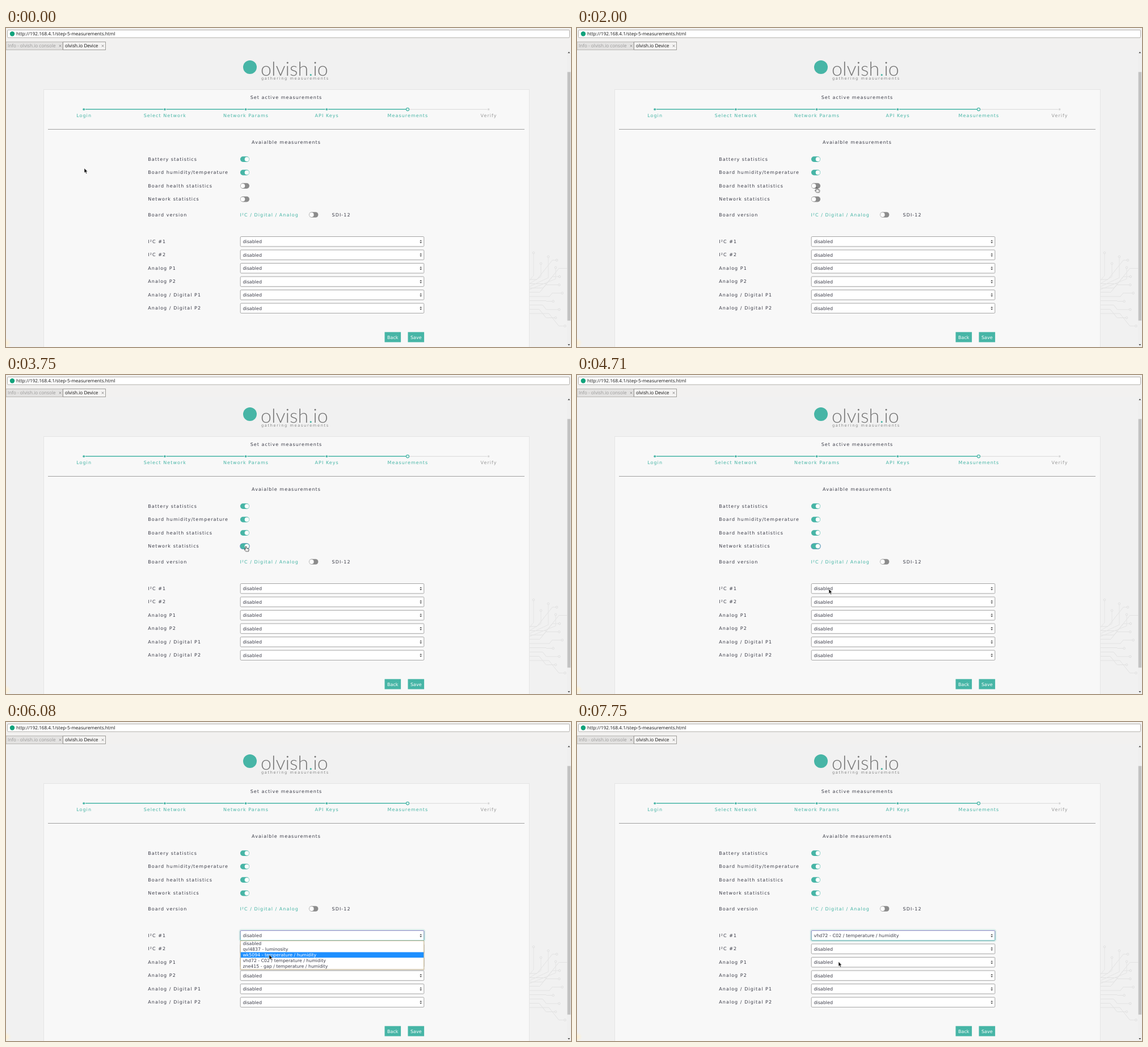
Write an HTML page that moves like this. It is 996 px wide and 562 px high and loops after 8 s.

```html
<!DOCTYPE html>
<html lang="en">
<head>
<meta charset="utf-8">
<title>Device measurements</title>
<style>
html, body { margin: 0; width: 100%; height: 100%; overflow: hidden; background: #f1f1f1; }
svg { display: block; width: 996px; height: 562px; }
text { font: 8px "DejaVu Sans", sans-serif; fill: #3b3c48; text-rendering: geometricPrecision; white-space: pre; }
.label { letter-spacing: 1.05px; }
.mid { text-anchor: middle; }
.teal { fill: #47b5a6; }
.pale { fill: #999; }
.ui { font: 8.18px "Open Sans", sans-serif; fill: #111; }
.ui.pale { fill: #999; }
.option { font-size: 7.82px; }
.white { fill: #fff; }
.brand { font: 300 34px Lato, sans-serif; fill: #757575; }
.tag { font-size: 6.6px; letter-spacing: 1.65px; fill: #858585; }

.anim { animation: 8s step-end infinite; }
#cursor { animation-name: move; }
#hand { animation-name: hand; }
#arrow { animation-name: arrow; }
#ring2 { animation-name: ring2; }
#ring3 { animation-name: ring3; }
#focus { animation-name: focus; }
#popup { animation-name: popup; }
#before { animation-name: before; }
#after { animation-name: after; }
#hi0 { animation-name: hi0; }
#hi1 { animation-name: hi1; }
#hi2 { animation-name: hi2; }
#hi3 { animation-name: hi3; }
#track2 { animation-name: track2; }
#knob2 { animation-name: knob2; }
#track3 { animation-name: track3; }
#knob3 { animation-name: knob3; }

@keyframes move {
  0% { transform: translate(138px, 247px); }
  8.875% { transform: translate(138px, 247px); animation-timing-function: steps(11, jump-start); }
  14.65% { transform: translate(290px, 263px); }
  19.75% { transform: translate(290px, 263px); animation-timing-function: steps(2, jump-start); }
  22% { transform: translate(426.5px, 286px); }
  22.875% { transform: translate(426.5px, 286px); animation-timing-function: steps(3, jump-start); }
  26.0625% { transform: translate(422.5px, 280.5px); }
  38% { transform: translate(422.5px, 280.5px); animation-timing-function: steps(3, jump-start); }
  41.9375% { transform: translate(423px, 301.5px); }
  50% { transform: translate(423px, 301.5px); animation-timing-function: steps(8, jump-start); }
  60.143% { transform: translate(444px, 377px); }
  65.625% { transform: translate(444.7px, 380px); }
  68.25% { transform: translate(451px, 384px); }
  69.75% { transform: translate(459px, 389.5px); }
  71.375% { transform: translate(463.5px, 394.3px); }
  72.875% { transform: translate(464px, 400px); }
  74.5% { transform: translate(464px, 405px); }
  76% { transform: translate(464px, 410px); }
  88.5% { transform: translate(463.5px, 413.5px); }
  89.8125% { transform: translate(462px, 418px); }
  91.125%, 100% { transform: translate(461px, 422.3px); }
}
@keyframes hand { 0% { opacity: 0; } 20.875% { opacity: 1; } 51.25%, 100% { opacity: 0; } }
@keyframes arrow { 0% { opacity: 1; } 20.875% { opacity: 0; } 51.25%, 100% { opacity: 1; } }
@keyframes ring2 { 0% { opacity: 0; } 33.375% { opacity: 1; } 43.75%, 100% { opacity: 0; } }
@keyframes ring3 { 0% { opacity: 0; } 43.75% { opacity: 1; } 60.375%, 100% { opacity: 0; } }
@keyframes focus { 0% { opacity: 0; } 60.375%, 100% { opacity: 1; } }
@keyframes popup { 0% { opacity: 0; } 62% { opacity: 1; } 96.875%, 100% { opacity: 0; } }
@keyframes before { 0% { opacity: 1; } 96.875%, 100% { opacity: 0; } }
@keyframes after { 0% { opacity: 0; } 96.875%, 100% { opacity: 1; } }
@keyframes hi0 { 0% { opacity: 1; } 72.875%, 100% { opacity: 0; } }
@keyframes hi1 { 0% { opacity: 0; } 72.875% { opacity: 1; } 76%, 100% { opacity: 0; } }
@keyframes hi2 { 0% { opacity: 0; } 76% { opacity: 1; } 89.8125%, 100% { opacity: 0; } }
@keyframes hi3 { 0% { opacity: 0; } 89.8125%, 100% { opacity: 1; } }
@keyframes track2 { 0% { fill: #8c8c8c; } 33.375% { fill: #6aa299; } 34.875%, 100% { fill: #47b5a6; } }
@keyframes knob2 { 0% { transform: none; } 33.375% { transform: translate(3.6px); } 34.875%, 100% { transform: translate(7.2px); } }
@keyframes track3 { 0% { fill: #8c8c8c; } 45.3125% { fill: #6aa299; } 46.875%, 100% { fill: #47b5a6; } }
@keyframes knob3 { 0% { transform: none; } 45.3125% { transform: translate(3.6px); } 46.875%, 100% { transform: translate(7.2px); } }
</style>
</head>
<body>
<svg id="stage" viewBox="0 0 996 562" xmlns="http://www.w3.org/2000/svg"></svg>
<script>
const TEAL = '#47b5a6';
const out = [];
const add = s => out.push(s);
const rect = (x, y, w, h, fill, more = '') =>
  `<rect x="${x}" y="${y}" width="${w}" height="${h}" fill="${fill}" ${more}/>`;
const circle = (x, y, r, fill, more = '') =>
  `<circle cx="${x}" cy="${y}" r="${r}" fill="${fill}" ${more}/>`;
const path = (d, stroke, width = 1, fill = 'none') =>
  `<path d="${d}" stroke="${stroke}" stroke-width="${width}" fill="${fill}"/>`;
const text = (x, y, str, cls = 'label') => `<text x="${x}" y="${y}" class="${cls}">${str}</text>`;
const anim = (id, inner) => `<g id="${id}" class="anim">${inner}</g>`;

function browser() {
  add(rect(0, 0, 996, 39, '#f2f1f0'));
  add(rect(2.5, 3.5, 991, 13.5, '#fff', 'rx="1.5" stroke="#b3b0ac"'));
  add(circle(11, 10.3, 4.2, '#12a37c'));
  add(text(18, 13.3, 'http://192.168.4.1/step-5-measurements.html', 'ui'));
  add(rect(0, 24.5, 100, 14, '#e3e2e1', 'stroke="#b9b7b4"'));
  add(rect(100.5, 24.5, 75, 14, '#f4f3f2', 'stroke="#a09e9b"'));
  add(text(3, 34.3, 'Info - olvish.io console', 'ui pale'));
  add(text(104, 34.3, 'olvish.io Device', 'ui'));
  for (const x of [95.5, 170.5])
    add(path(`M${x - 1.7} 29.8l3.4 3.4m0-3.4l-3.4 3.4`, '#777', 0.9));
}

function circuit() {
  // traces fanning out behind the card
  for (let i = 0; i < 9; i++) {
    const y = 443 + i * 7.5, bend = 936 + (i * 17) % 23, rise = 34 - i * 7;
    const end = bend + Math.abs(rise) * 0.8, tail = 6 + (i * 11) % 17;
    add(path(`M922 ${y}H${bend}L${end} ${y - rise}h${tail}`, '#e2e2e2', 1));
    add(circle(end + tail + 1.8, y - rise, 1.8, '#f1f1f1', 'stroke="#e0e0e0"'));
  }
  for (let i = 0; i < 4; i++) {
    const x = 930 + i * 13, top = 398 + (i * 19) % 31;
    add(path(`M922 ${446 + i * 5}L${x} ${436 + i * 2}V${top}`, '#e5e5e5', 1));
    add(circle(x, top - 2, 1.8, '#f1f1f1', 'stroke="#e2e2e2"'));
  }
}

function page() {
  add(rect(0, 39, 996, 523, '#f1f1f1'));
  add(circle(0, 555, 9, 'url(#glow)'));
  circuit();
  add(rect(66.5, 108.5, 856, 460, '#f8f8f8', 'stroke="#e5e5e5"'));
  add(rect(989, 39, 7, 523, '#efefef'));
  add(rect(989.6, 77.5, 5.6, 438, '#c2c2c2'));
  add('<path d="M990.3 44.2h4l-2-2.4zM990.3 557h4l-2 2.4z" fill="#444"/>');

  add(circle(430, 69, 12, TEAL));
  add(text(449, 83.5, `olvish<tspan fill="${TEAL}">.</tspan>io`, 'brand'));
  add(text(450, 90.5, 'gathering measurements', 'tag'));

  add(text(494, 125, 'Set active measurements', 'label mid'));
  add(path('M137 143.3H708', TEAL, 1.5));
  add(path('M708 143.3H851', '#dedede', 1.3));
  ['Login', 'Select Network', 'Network Params', 'API Keys', 'Measurements', 'Verify'].forEach((name, i) => {
    const x = 137.2 + i * 142.7;
    if (i < 4) add(circle(x, 143.3, 2.4, TEAL, 'stroke="#f8f8f8" stroke-width="1"'));
    if (i === 4) add(circle(x, 143.3, 2.5, '#fff', `stroke="${TEAL}" stroke-width="1.3"`));
    if (i === 5) add(circle(x, 143.3, 2.2, '#d6d6d6', 'stroke="#f8f8f8" stroke-width="1"'));
    add(text(x + 0.4, 157, name, 'label mid ' + (i < 5 ? 'teal' : 'pale')));
  });
  add(path('M74 178.5H914', '#a0a0a0', 1));
  add(text(494, 203.5, 'Avaialble measurements', 'label mid'));
}

function toggle(x, y, on, id) {
  const tag = name => id ? `id="${name}${id}" class="anim"` : '';
  if (id) add(anim('ring' + id, rect(x - 0.7, y - 5.4, 17.6, 10.8, '#6f8fc4', 'rx="5.4"')));
  add(rect(x, y - 4.8, 16.2, 9.6, on ? TEAL : '#8c8c8c', `rx="4.8" ${tag('track')}`));
  add(circle(x + (on ? 11.7 : 4.5), y, 3.9, '#fff', tag('knob')));
}

function toggles() {
  ['Battery statistics', 'Board humidity/temperature', 'Board health statistics', 'Network statistics']
    .forEach((name, i) => {
      const y = 231.1 + i * 23.5;
      add(text(250.3, y + 2.6, name));
      toggle(412.9, y, i < 2, i < 2 ? 0 : i);
    });
  add(text(250.3, 331.5, 'Board version'));
  add(text(412.4, 331.5, 'I²C / Digital / Analog', 'label teal'));
  toggle(534.2, 329, false);
  add(text(574.6, 331.5, 'SDI-12'));
}

const options = ['disabled', 'qvl4837 - luminosity', 'wk5094 - temperature / humidity',
  'vhd72 - C02 / temperature / humidity', 'zne415 - gap / temperature / humidity'];

function selects() {
  ['I²C #1', 'I²C #2', 'Analog P1', 'Analog P2', 'Analog / Digital P1', 'Analog / Digital P2']
    .forEach((name, i) => {
      const y = 376.2 + i * 23.5, base = y + 2.9;
      add(text(250.3, y + 2.3, name));
      add(rect(413.2, y - 8.7, 323.6, 17.4, '#fff', 'rx="1.5" stroke="#9b9b9b" stroke-width="0.9"'));
      if (i === 0) {
        add(anim('focus',
          rect(411.7, y - 10.2, 326.6, 20.4, 'none', `rx="3" stroke="${TEAL}" stroke-opacity="0.16" stroke-width="2.4"`) +
          rect(413.2, y - 8.7, 323.6, 17.4, '#fff', 'rx="1.5" stroke="url(#edge)"')));
        add(anim('before', text(417.4, base, options[0], '')));
        add(anim('after', text(417.4, base, options[3], '')));
      } else {
        add(text(417.4, base, options[0], ''));
      }
      add(`<path d="M729.3 ${y - 0.6}h3.8l-1.9-2.4zM729.3 ${y + 0.9}h3.8l-1.9 2.4z" fill="#555"/>`);
    });
}

function buttons() {
  [[667.5, 'Back'], [708.5, 'Save']].forEach(([x, name]) => {
    add(rect(x, 535.7, 28.6, 17.8, TEAL));
    add(text(x + 14.3, 547.5, name, 'mid white'));
  });
}

function popup() {
  const row = i => 385.7 + i * 9.9;
  let s = rect(411.5, 386, 327, 52.5, '#000', 'opacity="0.06" rx="2"') +
    rect(413.3, 385.4, 323.4, 50.5, '#fff', 'stroke="#c3b083" stroke-width="0.9"');
  options.forEach((name, i) => {
    s += text(417.4, row(i) + 7.6, name, 'option');
    if (i < 4) s += anim('hi' + i,
      rect(413.7, row(i), 322.6, 9.7, '#1e8fff') + text(417.4, row(i) + 7.6, name, 'option white'));
  });
  add(anim('popup', s));
}

function cursor() {
  const arrow = path('M0 0V8.3L1.9 6.6L3.2 9.7L4.6 9.1L3.3 6.1H5.8Z', '#fff', 0.5, '#111');
  const hand = path('M-.9 .9Q0-.6 .9 .9V3.6L4.4 4.4Q5.3 4.7 5.2 5.8L4.6 9.1H-.3L-3 5.9Q-2.9 4.5-.9 6Z', '#222', 0.8, '#fff') +
    path('M2.2 4V5.4M3.5 4.3V5.6', '#444', 0.5);
  add(anim('cursor', anim('arrow', arrow) + anim('hand', hand)));
}

add(`<defs>
  <radialGradient id="glow"><stop stop-color="#fff0cf"/><stop offset="1" stop-color="#fff0cf" stop-opacity="0"/></radialGradient>
  <linearGradient id="edge" x2="0" y2="1"><stop stop-color="#8d88c6"/><stop offset="1" stop-color="#4fb3b0"/></linearGradient>
</defs>`);
browser();
page();
toggles();
selects();
buttons();
popup();
cursor();
document.getElementById('stage').innerHTML = out.join('');
</script>
</body>
</html>
```
